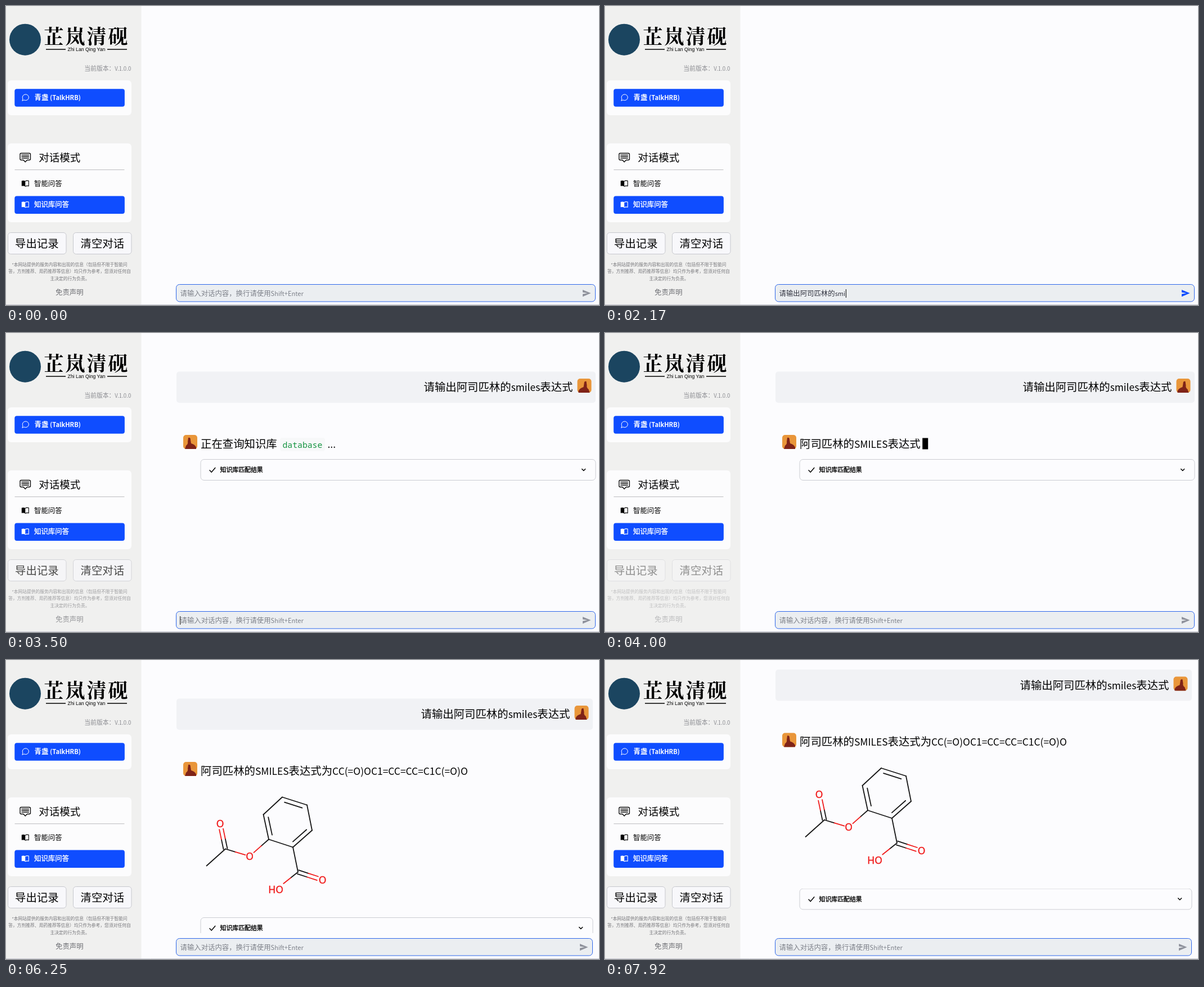
An HTML page for the animation above (8 s loop, 1054 px wide and 531 px high).

```html
<!DOCTYPE html>
<html lang="zh-CN">
<head>
<meta charset="utf-8">
<title>Chat</title>
<style>
  html, body { margin: 0; width: 100%; height: 100%; overflow: hidden; background: #fcfcfe; }
  svg { display: block; width: 1054px; height: 531px; --cut: 0px; --drop: 0px; --blue: #0f4dff;
    font-family: "Noto Sans CJK SC", "Noto Sans CJK", "Noto Sans", sans-serif;
    animation: layout 8s step-end infinite; }
  text { white-space: pre; }
  .latin { font-size: .896em; }
  .line { fill: none; stroke: currentColor; stroke-linecap: round; stroke-linejoin: round; }
  .card { fill: #fcfcfd; }
  .blue { fill: var(--blue); }
  .white { fill: #fff; color: #fff; }
  .mid { stroke: currentColor; stroke-width: .35px; }
  .menu { font-size: 12.4px; }
  .big { font-size: 19.4px; }
  .note { font-size: 7.77px; fill: #77777b; text-anchor: middle; }
  .out { fill: #f8f8fb; stroke: #c6c7cd; }
  .hint { font-size: 12.4px; fill: #7d8089; }
  .chat { animation: scroll 8s step-end infinite; }
  .stale { animation: stale 8s linear infinite; }
  .right { transform: translateX(calc(0px - var(--cut))); }
  .drop { transform: translateY(var(--drop)); }
  .msg { width: calc(745px - var(--cut)); }
  .exp { width: calc(702px - var(--cut)); }
  .field { width: calc(745px - var(--cut)); }
  .ask { animation: ask 8s step-end infinite; }
  .query { animation: query 8s step-end infinite; }
  .found { animation: found 8s step-end infinite; }
  .mol { animation: mol 8s step-end infinite; }
  .mouse { animation: move 8s ease-out infinite, mouse 8s step-end infinite; }
  .arrow { animation: arrow 8s step-end infinite; }
  .beam { animation: beam 8s step-end infinite; }

  @keyframes layout {
    0% { --cut: 0px; --drop: 0px; --blue: #0f4dff; }
    32.2% { --cut: 0px; --drop: 0px; --blue: #1f5bff; }
    42.7% { --cut: 0px; --drop: 0px; --blue: #0f4dff; }
    78.1%, 100% { --cut: 5px; --drop: 233px; --blue: #0f4dff; }
  }
  @keyframes scroll {
    0% { transform: none; }
    84.3% { transform: translateY(-17px); }
    85.4% { transform: translateY(-36px); }
    86.4% { transform: translateY(-47px); }
    87.5%, 100% { transform: translateY(-51.5px); }
  }
  @keyframes stale { 0%, 37.5% { opacity: 1; } 50%, 76% { opacity: .4; } 78.1%, 100% { opacity: 1; } }
  @keyframes ask { 0% { opacity: 0; } 38.5%, 100% { opacity: 1; } }
  @keyframes query { 0% { opacity: 0; } 39.6% { opacity: 1; } 46%, 100% { opacity: 0; } }
  @keyframes found { 0% { opacity: 0; } 41%, 100% { opacity: 1; } }
  @keyframes mol { 0% { opacity: 0; } 78.1%, 100% { opacity: 1; } }
  @keyframes move { 0%, 6% { transform: translate(530px, 420px); } 11.5%, 100% { transform: translate(417px, 505px); } }
  @keyframes mouse { 0% { opacity: 0; } 6% { opacity: 1; } 20.8%, 100% { opacity: 0; } }
  @keyframes arrow { 0% { opacity: 1; } 9%, 100% { opacity: 0; } }
  @keyframes beam { 0% { opacity: 0; } 9%, 100% { opacity: 1; } }
</style>
</head>
<body>
<svg viewBox="0 0 1054 531">
  <defs>
    <g id="book">
      <path d="M0 1Q4 0 6.5 1.6V11Q4 9.4 0 10.3Z"/>
      <path class="line" d="M6.5 1.6Q9 0 12.5 1V10.2Q9 9.4 6.5 10.8" stroke-width="1.1"/>
    </g>
    <g id="face">
      <rect width="25" height="25" rx="5" fill="#e9963a"/>
      <path d="M3 25L5 19Q9 16 8 12L9 5Q13 4 13 9L14 15Q21 17 23 22V25Z" fill="#7f2318"/>
    </g>
  </defs>

  <rect width="1054" height="531" fill="#fcfcfe"/>

  <g class="chat">
    <g class="ask">
      <rect class="msg" x="303" y="68.5" height="55.5" rx="5" fill="#f1f2f5"/>
      <g class="right">
        <text class="big" x="742.5" y="103">请输出阿司匹林的smiles表达式</text>
        <use href="#face" transform="translate(1040.5 81) scale(-1 1)"/>
      </g>
    </g>
    <g class="query">
      <use href="#face" x="315" y="181"/>
      <text class="big" x="346" y="203.5">正在查询知识库</text>
      <rect x="487" y="186" width="80" height="24" rx="4" fill="#f7f8f9"/>
      <text id="code" x="491.5" y="203.5" font-size="14.75" fill="#149440" font-family="'Noto Sans Mono', monospace">database</text>
      <text class="big" x="571.5" y="203.5">...</text>
    </g>
    <g id="reply" opacity="0">
      <use href="#face" x="315" y="181"/>
      <text id="answer" class="big" x="346" y="203.5"></text>
      <rect id="block" y="186.5" width="10" height="20"/>
    </g>
    <g class="mol"><g id="mol" transform="translate(0 17.5)" stroke-width="1.8" stroke-linecap="round"></g></g>
    <g class="found">
      <g class="drop">
        <rect class="exp" x="346" y="224.5" height="37" rx="6" fill="#fcfcfe" stroke="#cbccd2"/>
        <path class="line" d="M362 243.8l3.2 3.4 6.6-7.8" stroke-width="1.5"/>
        <text class="mid" x="380.5" y="247.2" font-size="10.9">知识库匹配结果</text>
        <g class="right"><path class="line" d="M1023.7 241.5l3 3 3-3" stroke-width="1.5"/></g>
      </g>
    </g>
  </g>

  <rect x="241" y="485" width="813" height="46" fill="#fcfcfe"/>
  <rect class="field" x="302.5" y="494.5" height="30.5" rx="6" fill="#ebeef1" stroke="#2d66ea"/>
  <text id="hint" class="hint" x="309.5" y="514.7">请输入对话内容，换行请使用Shift+Enter</text>
  <text id="typed" class="hint" x="309.5" y="514.7" style="fill:#31333f"></text>
  <rect id="caret" y="503" width="1" height="15" opacity="0"/>
  <g class="right"><path id="send" d="M1025 504l14.5 6-14.5 6.2v-4.8l8.5-1.4-8.5-1.4z" fill="#8f929c"/></g>

  <rect width="240.5" height="531" fill="#f0f0ef"/>
  <circle cx="34" cy="59.7" r="28" fill="#1b4560"/>
  <text x="67.5" y="67" font-size="35" letter-spacing="3" font-weight="700" font-family="'Noto Serif CJK SC', 'Noto Sans CJK SC', serif">芷岚清砚</text>
  <path d="M71 77H106M180 77H215" stroke="#000" stroke-width="1.4"/>
  <text id="pinyin" x="143" y="80" font-size="8.7" text-anchor="middle" font-family="'Liberation Sans', sans-serif">Zhi Lan Qing Yan</text>
  <text x="139.3" y="115" font-size="10.8" fill="#8b8c91">当前版本：V.1.0.0</text>

  <rect class="card" x="3" y="132" width="220" height="62" rx="6"/>
  <rect class="blue" x="15.3" y="147.3" width="195.6" height="31.5" rx="4"/>
  <g class="white menu">
    <path class="line" d="M29 168l.9-3.1a5.6 5.4 0 1 1 2.3 2.2z" stroke-width="1"/>
    <text x="50.5" y="167.2" font-weight="600">青盏 (TalkHRB)</text>
  </g>

  <rect class="card" x="3" y="244" width="220" height="140" rx="6"/>
  <path class="line" d="M27 261.5H41.5Q43.5 261.5 43.5 263.5V271.5Q43.5 273.5 41.5 273.5H37.5L34.2 277L31 273.5H27Q25 273.5 25 271.5V263.5Q25 261.5 27 261.5ZM28 264.7H40.5M28 267.5H40.5M28 270.3H40.5" stroke-width="1.3"/>
  <text x="58.2" y="275.8" font-size="18.5">对话模式</text>
  <path d="M15.5 290.8H210.5" stroke="#b9b9bd"/>
  <use href="#book" x="27.8" y="309.5"/>
  <text class="menu" x="50" y="320">智能问答</text>
  <rect class="blue" x="15.3" y="337.6" width="195.6" height="31.5" rx="4"/>
  <g class="white menu">
    <use href="#book" x="27.8" y="347"/>
    <text class="mid" x="50" y="357.3">知识库问答</text>
  </g>

  <g class="stale">
    <rect class="out" x="3.5" y="402.5" width="103.5" height="38" rx="5"/>
    <rect class="out" x="119.5" y="402.5" width="103.5" height="38" rx="5"/>
    <text class="big" x="16" y="429">导出记录</text>
    <text class="big" x="132.5" y="429">清空对话</text>
    <text class="note" x="113" y="462">*本网站提供的服务内容和出现的信息（包括但不限于智能问</text>
    <text class="note" x="113" y="474.3">答，方剂推荐、用药推荐等信息）均只作为参考，您须对任何自</text>
    <text class="note" x="113.5" y="486.7">主决定的行为负责。</text>
    <text x="88" y="512.5" font-size="12.4" fill="#6f7075">免责声明</text>
  </g>

  <path d="M0 530.5H1054" stroke="#c9cad3"/>
  <g class="mouse">
    <path class="arrow" d="M0 0V13L3 10.3L5 15L7 14L5 9.5H9Z" stroke="#fff"/>
    <path class="line beam" d="M-2.5-5.5Q0-5.5 0-4Q0-5.5 2.5-5.5M0-4V5M-2.5 6Q0 6 0 4.5Q0 6 2.5 6" stroke-width="1.1"/>
  </g>
</svg>
<script>
const $ = id => document.getElementById(id);
const QUESTION = '请输出阿司匹林的smiles表达式';
const ANSWER = '阿司匹林的SMILES表达式为CC(=O)OC1=CC=CC=C1C(=O)O';
const RED = '#f01818', BLACK = '#151515';

// Latin runs are set a little smaller than the Chinese around them
function setText(el, text) {
  if (el.dataset.text === text) return;
  el.dataset.text = text;
  el.innerHTML = text.replace(/[!-~]+/g, '<tspan class="latin">$&</tspan>');
}
document.querySelectorAll('text:not(#code, #pinyin)').forEach(el => setText(el, el.textContent));

// Molecule: ring corners, then the side groups
const ring = [[491, 226], [535, 240], [544, 285], [510, 315], [467, 301], [457.5, 257]];
const center = [501, 270.7];
const acetyl = [390, 318], acid = [519, 359];
const mix = (a, b, k) => a.map((v, i) => v + (b[i] - v) * k);
const parts = [];

function line(a, b, color = BLACK) {
  parts.push(`<path d="M${a}L${b}" stroke="${color}"/>`);
}
// Bond to an oxygen: black half, red half, stopping short of the letter
function toOxygen(a, o, stop, off = 0) {
  const len = Math.hypot(o[0] - a[0], o[1] - a[1]);
  const n = [(a[1] - o[1]) / len * off, (o[0] - a[0]) / len * off];
  const at = k => mix(a, o, k).map((v, i) => v + n[i]);
  line(at(0), at(stop / 2));
  line(at(stop / 2), at(stop), RED);
}
function label(text, x, y) {
  parts.push(`<text class="mid" x="${x}" y="${y}" font-size="17.5" fill="${RED}" color="${RED}" text-anchor="middle" font-family="'Noto Sans', sans-serif">${text}</text>`);
}

ring.forEach((p, i) => {
  const q = ring[(i + 1) % 6];
  line(p, q);
  if (i % 2 === 0) {
    const a = mix(p, center, .19), b = mix(q, center, .19);
    line(mix(a, b, .06), mix(a, b, .94));
  }
});
line(acetyl, [356.5, 348]);
line(ring[3], acid);
toOxygen(ring[4], [433, 331], .78);
toOxygen(acetyl, [433, 331], .82);
toOxygen(acid, [480, 390], .66);
for (const off of [-3.5, 3.5]) {
  toOxygen(acetyl, [380.5, 273], .78, off);
  toOxygen(acid, [562, 373], .81, off);
}
label('O', 380.5, 279.3);
label('O', 433, 337.3);
label('O', 562.5, 379.3);
label('HO', 479.5, 396);
$('mol').innerHTML = parts.join('');

const count = (t, from, to, n) => Math.max(0, Math.min(n, Math.ceil((t - from) / (to - from) * n)));

function draw(now) {
  const t = now % 8000;

  const typing = t > 1680 && t < 2750;
  const typed = typing ? QUESTION.slice(0, count(t, 1680, 2450, QUESTION.length)) : '';
  setText($('typed'), typed);
  $('hint').setAttribute('opacity', typed ? 0 : 1);
  $('send').setAttribute('fill', typed ? '#0f4dff' : '#8f929c');

  const blink = t > 3330 && t < 6250 && Math.floor((t - 3330) / 500) % 2 === 0;
  $('caret').setAttribute('opacity', typing || blink ? 1 : 0);
  $('caret').setAttribute('x', 309.2 + (typed ? $('typed').getComputedTextLength() + 1 : 0));

  const done = t >= 6248;
  const full = ANSWER + (done ? '' : '。');
  setText($('answer'), full.slice(0, done ? full.length : count(t, 3680, 4600, full.length)));
  $('reply').setAttribute('opacity', t >= 3680 ? 1 : 0);
  $('block').setAttribute('opacity', done ? 0 : 1);
  $('block').setAttribute('x', 349.5 + $('answer').getComputedTextLength());
}

function tick() {
  draw(performance.now());
  requestAnimationFrame(tick);
}
tick();
</script>
</body>
</html>
```
